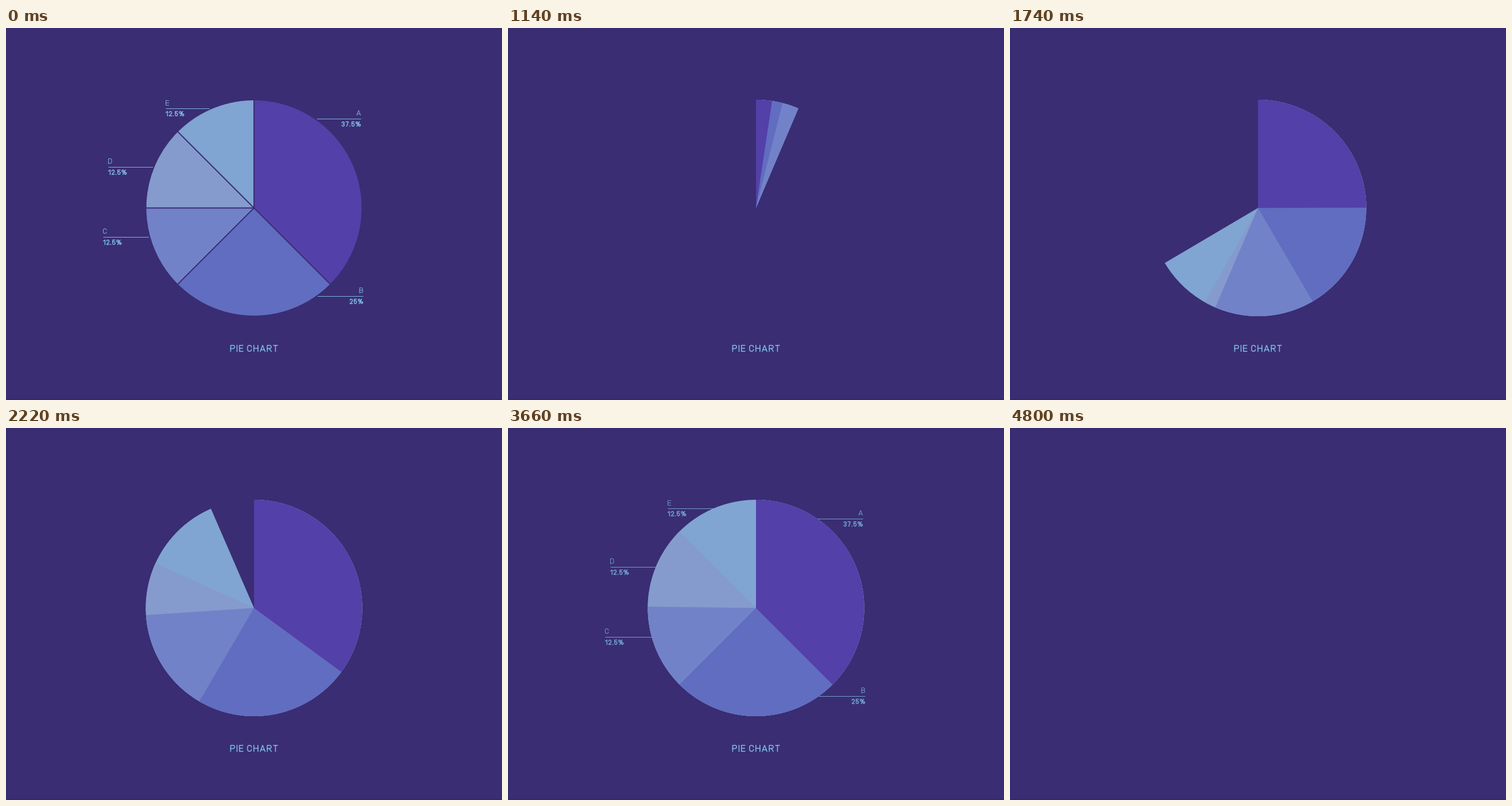
A matplotlib script that plays this animation: 864 px wide and 648 px high, repeating every 6300 ms.

```python
import numpy as np
import matplotlib.pyplot as plt
from matplotlib.animation import FuncAnimation
from matplotlib.colors import to_rgb
from matplotlib.patches import PathPatch, Rectangle, Wedge
from matplotlib.path import Path

W, H, DPI = 864, 648, 100
STEP, LOOP = 30, 6300
PX = 72 / DPI

BG = "#3a2d73"
EDGE = "#34296a"
INK = "#7cb4e0"
CENTER, RADIUS = (432, 313.5), 188.5

# colour, end angle (clockwise from the top), entry (ms, x2), exit ms
SLICES = [
    ("#5340a8", 135, (1800, 1 / 3), 999),
    ("#616dc0", 225, (1800, 1 / 3), 1103),
    ("#7282c8", 270.7, (1515, 0.397), 908),
    ("#859bcd", 315, (1800, 1 / 3), 1094),
    ("#80a5d2", 360, (1800, 1 / 3), 1100),
]

# name, value, left end of the rule, its height, right aligned
LABELS = [
    ("A", "37.5%", 537, 157.5, True),
    ("B", "25%", 541, 466.5, True),
    ("C", "12.5%", 169, 363.5, False),
    ("D", "12.5%", 178, 241.5, False),
    ("E", "12.5%", 278, 139.5, False),
]
RULE = 81


# ---- lettering: monoline strokes in a unit box, with width / cap height ----

def arc(cx, cy, rx, ry, a0, a1):
    a = np.radians(np.linspace(a0, a1, 16))
    return list(zip(cx + rx * np.cos(a), cy + ry * np.sin(a)))


P_BOWL = [(0, 0), (0, 1), (.6, 1)] + arc(.62, .73, .38, .27, 90, -90) + [(0, .46)]

GLYPHS = {
    " ": (.12, []),
    "A": (.80, [[(0, 0), (.5, 1), (1, 0)], [(.18, .26), (.82, .26)]]),
    "B": (.70, [[(0, 0), (0, 1), (.6, 1)] + arc(.62, .76, .32, .24, 90, -90)
                + [(0, .52)],
                [(.6, .52)] + arc(.65, .26, .35, .26, 90, -90) + [(0, 0)]]),
    "C": (.70, [arc(.5, .7, .5, .3, 5, 180) + arc(.5, .3, .5, .3, 180, 355)]),
    "D": (.70, [[(0, 0), (0, 1)] + arc(.5, .7, .5, .3, 90, 0)
                + arc(.5, .3, .5, .3, 0, -90) + [(0, 0)]]),
    "E": (.62, [[(1, 1), (0, 1), (0, 0), (1, 0)], [(0, .51), (.9, .51)]]),
    "H": (.72, [[(0, 0), (0, 1)], [(1, 0), (1, 1)], [(0, .51), (1, .51)]]),
    "I": (.14, [[(0, 0), (0, 1)]]),
    "P": (.70, [P_BOWL]),
    "R": (.70, [P_BOWL, [(.5, .46), (1, 0)]]),
    "T": (.67, [[(0, 1), (1, 1)], [(.5, 0), (.5, 1)]]),
    "1": (.45, [[(0, .78), (1, 1), (1, 0)]]),
    "2": (.62, [arc(.5, .7, .5, .3, 170, -35) + [(0, 0), (1, 0)]]),
    "3": (.62, [arc(.5, .74, .46, .26, 165, -90)
                + arc(.5, .26, .5, .26, 90, -165)]),
    "5": (.62, [[(.95, 1), (.05, 1), (0, .48)]
                + arc(.5, .32, .5, .32, 140, -165)]),
    "7": (.60, [[(0, 1), (1, 1), (.35, 0)]]),
    ".": (.19, [[(0, 0), (0, .02)]]),
    "%": (1.0, [arc(.2, .77, .2, .23, 0, 360), arc(.8, .23, .2, .23, 0, 360),
                [(.76, 1), (.24, 0)]]),
}


def lettering(text, x, mid, cap, weight, gap, right=False):
    """Stroke a line of text; x is its left (or right) end, mid its centre."""
    widths = [GLYPHS[c][0] * cap for c in text]
    if right:
        x -= sum(widths) + gap * (len(text) - 1)
    base = mid + cap / 2 - weight / 2
    points, codes = [], []
    for char, width in zip(text, widths):
        inner = max(width - weight, 0)
        for stroke in GLYPHS[char][1]:
            points += [(x + weight / 2 + px * inner, base - py * (cap - weight))
                       for px, py in stroke]
            codes += [Path.MOVETO] + [Path.LINETO] * (len(stroke) - 1)
        x += width + gap
    patch = PathPatch(Path(points, codes), fill=False, lw=weight * PX,
                      capstyle="projecting", joinstyle="round", zorder=5)
    return ax.add_patch(patch)


# ---- timing ----

U = np.linspace(0, 1, 800)


def ease(x, x1, x2):
    xs = 3 * U * (1 - U) ** 2 * x1 + 3 * U ** 2 * (1 - U) * x2 + U ** 3
    return float(np.interp(x, xs, 3 * U ** 2 - 2 * U ** 3))


def ramp(t, start, length):
    return min(max((t - start) / length, 0), 1)


def mix(color, amount):
    a, b = np.array(to_rgb(BG)), np.array(to_rgb(color))
    return tuple(a + (b - a) * amount)


# ---- stage ----

fig = plt.figure(figsize=(W / DPI, H / DPI), dpi=DPI, facecolor=BG)
ax = fig.add_axes([0, 0, 1, 1])
ax.set_xlim(0, W)
ax.set_ylim(H, 0)
ax.axis("off")

ax.add_patch(Rectangle((0, H - 1.5), W, 1.5, fc="#30265f", ec="none"))
border = ax.add_patch(Rectangle((.5, .5), W - 1, H - 1, fill=False,
                                ec=EDGE, lw=PX))

wedges = [ax.add_patch(Wedge(CENTER, RADIUS, 0, 1, joinstyle="round",
                             zorder=4 - 0.1 * i))
          for i in range(len(SLICES))]

title = lettering("PIE CHART", 390.6, 558, 12, 1.6, 2.6)
label_inks, rules = [], []
for name, value, x, y, right in LABELS:
    end = x + RULE if right else x
    label_inks.append(lettering(name, end, y - 9.7, 9.2, .95, 1.4, right))
    label_inks.append(lettering(value, end, y + 9.7, 9.2, 1.55, 1.45, right))
    rules += ax.plot([x, x + RULE], [y, y], lw=PX, zorder=3,
                     solid_capstyle="butt")


def show_text(title_amount, label_amount):
    title.set_visible(title_amount > 0)
    title.set_edgecolor(mix(INK, title_amount))
    for ink in label_inks:
        ink.set_visible(label_amount > 0)
        ink.set_edgecolor(mix(INK, label_amount))
    for rule in rules:
        rule.set_visible(label_amount > 0)
        rule.set_color(mix(INK, label_amount))


def show_pie(start, ends, amount=1, outlined=False):
    for wedge, (color, *_), end in zip(wedges, SLICES, ends):
        wedge.set_visible(amount > 0 and end - start > .02)
        wedge.set_theta1(start - 90)
        wedge.set_theta2(end - 90)
        wedge.set_facecolor(mix(color, amount))
        wedge.set_edgecolor(BG if outlined else "none")
        wedge.set_linewidth(2 * PX if outlined else 0)


def draw(i):
    t = i * STEP
    border.set_visible(t >= 390)

    if t < 900:
        amount = 1 - ramp(t, 360, 210)
        show_text(amount, amount)
        show_pie(0, [135, 225, 270, 315, 360], amount, outlined=True)
        return

    show_text(min(ramp(t, 870, 180), 1 - ramp(t, 4620, 180)),
              min(ramp(t, 2790, 180), 1 - ramp(t, 3630, 180)))

    start = 360 * ease(ramp(t, 3700, 1030), 2 / 3, 2 / 3)
    ends = []
    for _, full, (length, x2), leave in SLICES:
        grown = full * ease(ramp(t, 900, length), 1 / 3, x2)
        away = ease(ramp(t, 3700, leave), 2 / 3, 2 / 3)
        ends.append(grown + (360 - full) * away)
    show_pie(start, ends)


anim = FuncAnimation(fig, draw, frames=LOOP // STEP, interval=STEP,
                     init_func=lambda: draw(0), repeat=True, repeat_delay=0,
                     blit=False)
plt.show()
```
